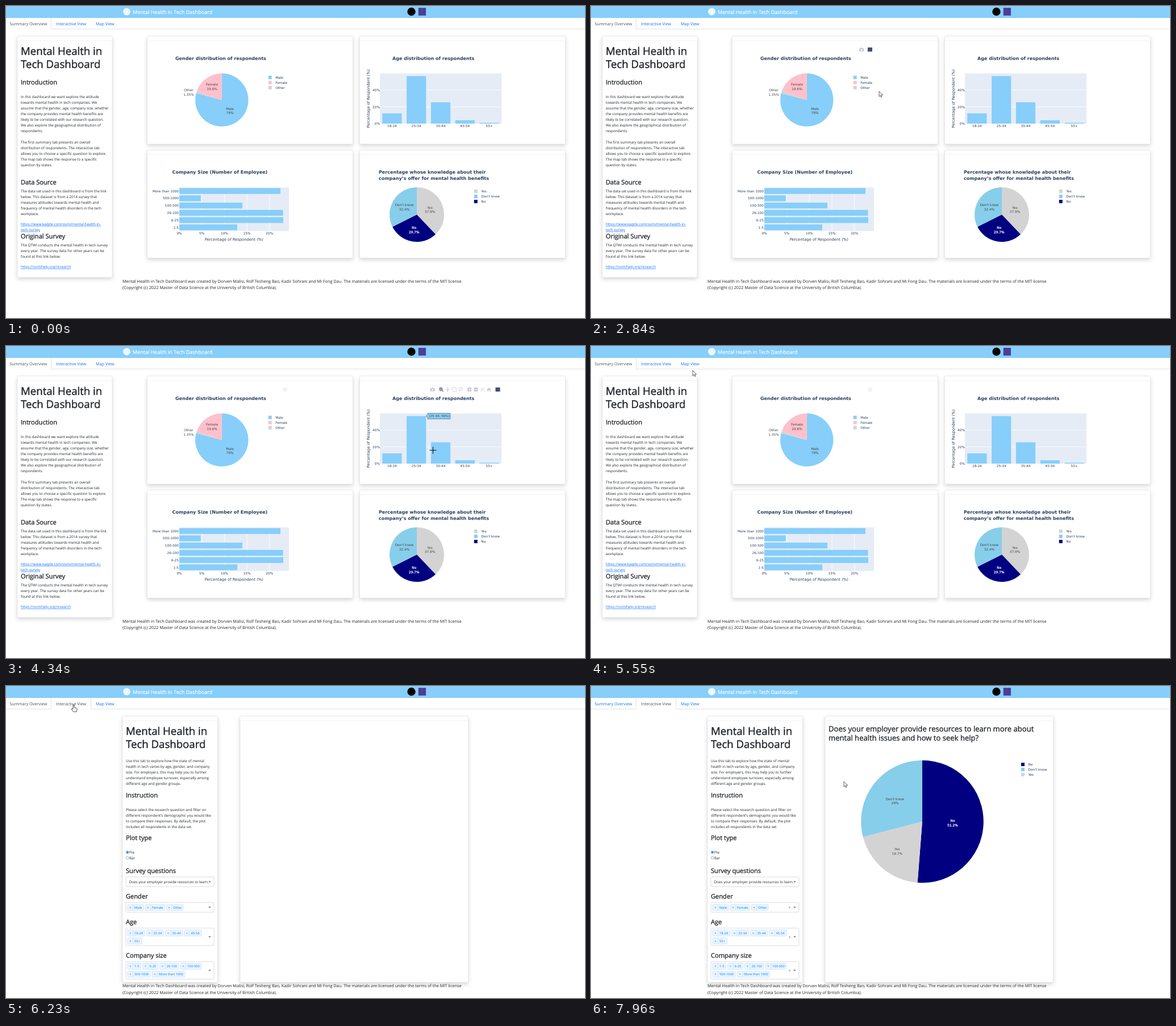
Write an HTML page that moves like this. It is 1019 px wide and 549 px high and loops after 8 s.

```html
<!DOCTYPE html>
<html lang="en">
<head>
<meta charset="utf-8">
<title>Mental Health in Tech Dashboard</title>
<style>
html, body { margin: 0; width: 100%; height: 100%; overflow: hidden; background: #fff; }
svg { display: block; width: 100%; height: 100%; }
text { font: 6.34px "Open Sans", "Noto Sans", sans-serif; fill: #212529; text-rendering: geometricPrecision; white-space: pre; }
/* A thin outline gives the medium weight between regular and semibold */
.h1, .h2, .question { stroke: #212529; stroke-width: .32; }
.h1 { font-size: 18.6px; stroke-width: .42; }
.h2 { font-size: 11.1px; }
.question { font-size: 13.08px; }
.brand { font-size: 9.05px; fill: #fff; stroke: #fff; stroke-width: .15; }
.tab { font-size: 7.25px; fill: #0d6efd; }
.tab.on { fill: #495057; }
.foot { font-size: 7.31px; }
.link { fill: #0d6efd; text-decoration: underline; }
.tag { font-size: 5.8px; fill: #007eff; }
.title, .label, .axis, .tip { font-family: "DejaVu Sans", Verdana, sans-serif; fill: #2a3f5f; }
.title { font-size: 8.03px; font-weight: bold; }
.axis { font-size: 6.79px; }
.label { font-size: 5.8px; }
.tip { font-size: 5.5px; fill: #444; }
.dark { fill: #444; }
.light { fill: #fff; stroke: #fff; stroke-width: .25; }
.mid { text-anchor: middle; }
.end { text-anchor: end; }
.card { fill: #fff; stroke: #dfdfdf; stroke-width: .6; filter: drop-shadow(0 3.5px 3.5px rgba(0,0,0,.16)); }
.icon { fill: #c3c8d1; stroke: none; }
.line { fill: none; stroke: #c3c8d1; stroke-width: 1; }
.active { stroke: #6a7890; stroke-width: 1.3; }
</style>
</head>
<body>
<svg id="stage" viewBox="0 0 1019 549" xmlns="http://www.w3.org/2000/svg"></svg>
<script>
const SKY = '#87cefa', PINK = '#ffc0cb', GRAY = '#d3d3d3', NAVY = '#000080', BLUE = '#87ceeb', PLOT = '#e5ecf6';
const LOOP = 8000, SWITCH = 6160, LOADED = 6630;

const text = (x, y, s, cls = '', more = '') => `<text x="${x}" y="${y}" class="${cls}" ${more}>${s}</text>`;
const lines = (x, y, step, cls, ...rows) => rows.map((s, i) => text(x, y + i * step, s, cls)).join('');
const rect = (x, y, w, h, fill, more = '') => `<rect x="${x}" y="${y}" width="${w}" height="${h}" fill="${fill}" ${more}/>`;
const path = (d, more) => `<path d="${d}" ${more}/>`;
const group = (id, body) => `<g id="${id}">${body}</g>`;

const card = (x, y, r, b) => rect(x, y, r - x, b - y, '#fff', 'class="card" rx="2"') +
  path(`M${x} ${y + 8}H${r}`, 'stroke="#ececec" stroke-width=".7"');

function pie(cx, cy, r, slices) {
  let a = 0;
  const at = p => `${cx + r * Math.sin(p * 2 * Math.PI)} ${cy - r * Math.cos(p * 2 * Math.PI)}`;
  return slices.map(([share, fill]) => {
    const from = at(a), to = at(a += share);
    return path(`M${cx} ${cy}L${from}A${r} ${r} 0 ${share > .5 ? 1 : 0} 1 ${to}Z`, `fill="${fill}"`);
  }).join('');
}

const pair = (x, y, name, value, cls = 'dark') => lines(x, y, 7.5, `label mid ${cls}`, name, value);

const legend = (x, y, items) => items.map(([name, fill], i) =>
  rect(x, y + i * 9 - 3, 6, 6, fill) + text(x + 12.5, y + i * 9 + 2.1, name, 'label')).join('');

function hover(id, x, y, rows, fill, width, dir = 1) {
  const h = rows.length > 1 ? 8.7 : 5, near = x + 3 * dir, far = near + width * dir;
  return group(id, path(`M${x} ${y}L${near} ${y - 3}V${y - h}H${far}V${y + h}H${near}V${y + 3}Z`,
    `fill="${fill}" stroke="#444" stroke-width=".6"`) +
    lines(Math.min(near, far) + 2, y + (rows.length > 1 ? -2 : 2), 7.6, 'tip', ...rows));
}

const icons = {
  camera: '<path class="icon" d="M-4-2.2h2l1-1.2h2l1 1.2h2v5.4h-8z"/><circle r="1.5" fill="#fff" cy=".4"/>',
  zoom: '<g class="line active"><circle cx="-.6" cy="-.6" r="2.5"/><path d="M1.3 1.3 3.6 3.6M-1.8-.6H.6M-.6-1.8V.6"/></g>',
  pan: '<path class="line" d="M-3.6 0H3.6M0-3.6V3.6M-1-2.6 0-3.6 1-2.6M-1 2.6 0 3.6 1 2.6"/>',
  box: '<path class="line" stroke-dasharray="1.6 .8" d="M-3.3-3.3H3.3V3.3H-3.3Z"/>',
  lasso: '<path class="line" d="M-2 1C-5-1-2-3.5 1-3.2S4 1 0 1.2Q-3 1.2-2 3.4"/>',
  plus: '<path class="icon" d="M-3.4-3.4H3.4V3.4H-3.4Z"/><path d="M-2 0H2M0-2V2" stroke="#fff"/>',
  minus: '<path class="icon" d="M-3.4-3.4H3.4V3.4H-3.4Z"/><path d="M-2 0H2" stroke="#fff"/>',
  fit: '<path class="line" d="M-3.2-3.2 3.2 3.2M3.2-3.2-3.2 3.2"/>',
  home: '<path class="icon" d="M0-3.4 4 .2H2.8V3.2H.8V1H-.8V3.2H-2.8V.2H-4Z"/>',
  mark: '<rect x="-4" y="-3.6" width="8" height="7.2" fill="#3f4f75"/>'
};
const modebar = (id, list) => group(id, list.map(([name, x]) =>
  `<g transform="translate(${x} 76.6)">${icons[name]}</g>`).join(''));

const footer = y => lines(205, y, 11.5, 'foot',
  'Mental Health in Tech Dashboard was created by Dorven Malisi, Rolf Tesheng Bao, Kadir Sohrani and Mi Fong Dau. The materials are licensed under the terms of the MIT license',
  '(Copyright (c) 2022 Master of Data Science at the University of British Columbia).');

const header = rect(0, 0, 1019, 21, SKY) +
  '<circle cx="212.5" cy="10" r="6.5" fill="#eef8ff"/><circle cx="713.5" cy="10" r="7.2" fill="#000"/>' +
  rect(725.8, 3.2, 13.2, 13.6, '#4b3f98') +
  text(223, 13.6, 'Mental Health in Tech Dashboard', 'brand') +
  '<path id="tabline" fill="none" stroke="#dee2e6"/>' +
  text(6.5, 34.1, 'Summary Overview', 'tab', 'id="tab0"') +
  text(88, 34.1, 'Interactive View', 'tab', 'id="tab1"') + text(158, 34.1, 'Map View', 'tab');

const intro = card(20, 53, 187, 477.5) +
  lines(26, 86.3, 23, 'h1', 'Mental Health in', 'Tech Dashboard') +
  text(26, 138, 'Introduction', 'h2') +
  lines(26, 162.2, 10, '', 'In this dashboard we want explore the attitude', 'towards mental health in tech companies. We',
    'assume that the gender, age, company size, whether', 'the company provides mental health benefits are',
    'likely to be correlated with our research question.', 'We also explore the geographical distribution of', 'respondents.', '',
    'The first summary tab presents an overall', 'distribution of respondents. The interactive tab',
    'allows you to choose a specific question to explore.', 'The map tab shows the response to a specific', 'question by states.') +
  text(26, 314.3, 'Data Source', 'h2') +
  lines(26, 328.2, 10, '', 'The data set used in this dashboard is from the link', 'below. This dataset is from a 2014 survey that',
    'measures attitudes towards mental health and', 'frequency of mental health disorders in the tech', 'workplace.') +
  lines(26, 385.8, 10, 'link', 'https://www.kaggle.com/osmi/mental-health-in-', 'tech-survey') +
  text(26, 409.4, 'Original Survey', 'h2') +
  lines(26, 423.4, 10, '', 'The QTWI conducts the mental health in tech survey', 'every year. The survey data for other years can be', 'found at this link below.') +
  text(26, 461.2, 'https://osmihelp.org/research', 'link');

const genderChart = card(248.5, 53, 610.5, 243) + text(298, 94.6, 'Gender distribution of respondents', 'title') +
  pie(379.8, 165.3, 46.7, [[.7905, SKY], [.0135, GRAY], [.196, PINK]]) +
  pair(394, 182.6, 'Male', '79%') + pair(362.5, 140.1, 'Female', '19.6%') + pair(321.5, 150.2, 'Other', '1.35%') +
  legend(461.7, 125.7, [['Male', SKY], ['Female', PINK], ['Other', GRAY]]);

const ageChart = card(622.5, 53, 984.5, 243) + text(680, 94.6, 'Age distribution of respondents', 'title') +
  rect(658, 118.7, 214, 88.3, PLOT) + path('M658 147.8H872M658 177.4H872', 'stroke="#fff" stroke-width=".8"') +
  [['18-24', 12.2], ['25-34', 56.5], ['35-44', 25.4], ['45-54', 4], ['55+', 1]].map(([name, v], i) => {
    const x = 679.4 + i * 42.8, h = v * 1.48;
    return rect(x - 17.1, 207 - h, 34.2, h, SKY) + text(x, 213.4, name, 'label mid');
  }).join('') +
  [0, 20, 40].map(v => text(658, 209.2 - v * 1.48, v + '%', 'label end')).join('') +
  text(0, 0, 'Percentage of Respondent (%)', 'axis mid', 'transform="translate(639.8 163) rotate(-90)"');

const sizeChart = card(248.5, 253.5, 610.5, 443.5) + text(292.5, 295.3, 'Company Size (Number of Employee)', 'title') +
  rect(305, 319.2, 193, 76.6, PLOT) +
  [0, 1, 2, 3, 4].map(i => {
    const x = 305 + i * 39.7;
    return path(`M${x} 319.2V395.8`, 'stroke="#fff" stroke-width=".8"') + text(x, 402.3, i * 5 + '%', 'label mid');
  }).join('') +
  [['More than 1000', 483], ['500-1000', 342.7], ['100-500', 416], ['26-100', 487.5], ['6-25', 488], ['1-5', 407]].map(([name, r], i) => {
    const y = 325.6 + i * 12.77;
    return rect(305, y - 5.1, r - 305, 10.2, SKY) + text(304, y + 2.1, name, 'label end');
  }).join('') +
  text(401.3, 413.3, 'Percentage of Respondent (%)', 'axis mid');

const benefitChart = card(622.5, 253.5, 984.5, 443.5) +
  lines(656, 295.3, 10.2, 'title', 'Percentage whose knowledge about their', 'company’s offer for mental health benefits') +
  pie(723, 367, 48, [[.379, GRAY], [.297, NAVY], [.324, BLUE]]) +
  pair(746, 356.6, 'Yes', '37.9%') + pair(701, 352.3, "Don't know", '32.4%') + pair(718.3, 392.2, 'No', '29.7%', 'light') +
  legend(823.8, 326, [['Yes', GRAY], ["Don't know", BLUE], ['No', NAVY]]);

const summary = intro + genderChart + ageChart + sizeChart + benefitChart + footer(486.6) +
  modebar('bar1', [['camera', 476], ['mark', 491]]) + rect(487, 73, 8, 7.2, '#f3f3f3', 'id="ghost"') +
  modebar('bar2', [['camera', 750.5], ['zoom', 766], ['pan', 777.3], ['box', 789], ['lasso', 800.3], ['plus', 815.6],
    ['minus', 827], ['fit', 838.5], ['home', 850], ['mark', 865.5]]) +
  hover('male', 417, 183.8, ['Male', '79%'], SKY, 17) + hover('female', 346, 141, ['Female', '19.6%'], PINK, 25, -1) +
  hover('age0', 696.5, 189, ['(18-24, 12%)'], SKY, 40) + hover('age1', 739.3, 123.3, ['(25-34, 56%)'], SKY, 39.5) +
  hover('age2', 782.1, 169.4, ['(35-44, 25%)'], SKY, 39.5);

const select = (y, b) => rect(211, y, 155, b - y, '#fff', 'rx="2" stroke="#ccc" stroke-width=".7"') +
  path(`M356 ${(y + b) / 2 - 1.2}h5l-2.5 2.7z`, 'fill="#888"');
const tags = (y, ...list) => list.map(([name, x, r]) =>
  rect(x, y - 5.4, r - x, 10.8, '#ebf5ff', 'rx="1" stroke="#c2e0ff" stroke-width=".7"') +
  path(`M${x + 9.6} ${y - 5.4}v10.8`, 'stroke="#c2e0ff" stroke-width=".7"') +
  text(x + 5, y + 2, '×', 'tag mid') + text(x + 12, y + 2.1, name, 'tag')).join('');
const radio = (y, name, on) => `<circle cx="213.7" cy="${y}" r="2.4" fill="#fff" stroke="${on ? '#0075ff' : '#767676'}" stroke-width=".6"/>` +
  (on ? `<circle cx="213.7" cy="${y}" r="1.5" fill="#0075ff"/>` : '') + text(217, y + 2.5, name);

const controls = card(205, 53, 372.5, 521.5) +
  lines(211, 86.3, 23, 'h1', 'Mental Health in', 'Tech Dashboard') +
  lines(211, 134.3, 10, '', 'Use this tab to explore how the state of mental', 'health in tech varies by age, gender, and company',
    'size. For employers, this may help you to further', 'understand employee turnover, especially among', 'different age and gender groups.') +
  text(211, 196.3, 'Instruction', 'h2') +
  lines(211, 220, 10, '', 'Please select the research question and filter on', 'different respondent’s demographic you would like',
    'to compare their responses. By default, the plot', 'includes all respondents in the data set.') +
  text(211, 271.2, 'Plot type', 'h2') + radio(292.5, 'Pie', true) + radio(302.4, 'Bar') +
  text(211, 329.2, 'Survey questions', 'h2') + select(336, 353) +
  text(216.5, 346.6, 'Does your employer provide resources to learn.') +
  text(211, 374.4, 'Gender', 'h2') + select(381, 398) +
  tags(389.6, ['Male', 214, 242], ['Female', 245, 279], ['Other', 282, 312]) +
  text(211, 419.2, 'Age', 'h2') + select(426, 456.8) +
  tags(434.6, ['18-24', 214, 244.5], ['25-34', 247.3, 277.5], ['35-44', 280.5, 310.7], ['45-54', 313.5, 344]) +
  tags(448.5, ['55+', 214, 239.5]) +
  text(211, 478.4, 'Company size', 'h2') + select(485, 515.8) +
  tags(493.1, ['1-5', 214, 237.5], ['6-25', 240.5, 267.5], ['26-100', 270.5, 304], ['100-500', 307, 343.5]) +
  tags(507, ['500-1000', 214, 254], ['More than 1000', 257, 314.5]);

const answer = [389.6, 441.3, 500.4].map(y => text(349.5, y + 2.5, '×', 'mid', 'fill-opacity=".8"')).join('') +
  lines(418, 80.3, 16, 'question', 'Does your employer provide resources to learn more about', 'mental health issues and how to seek help?') +
  pie(583, 238.5, 107.8, [[.5124, NAVY], [.1972, GRAY], [.2904, BLUE]]) +
  pair(636.5, 239.4, 'No', '51.2%', 'light') + pair(535, 200.6, "Don't know", '29%') + pair(538.8, 289.4, 'Yes', '19.7%') +
  legend(757, 138, [['No', NAVY], ["Don't know", BLUE], ['Yes', GRAY]]);

const cursors = '<g id="cursor">' +
  group('arrow', path('M0 0V9.4L2.2 7.4 3.6 10.6 5.1 10 3.7 6.8H6.6Z', 'fill="#fff" stroke="#222" stroke-width=".7"')) +
  group('cross', path('M-6 0H6M0-6V6', 'stroke="#111" stroke-width="1.1"')) +
  group('hand', path('M-1 1Q0-.6 1 1V5L5 6Q6 6.5 6 8L5 12.5H-.5L-3.8 8Q-3.6 6.4-2 7.2L-1 8Z', 'fill="#fff" stroke="#222" stroke-width=".8"')) + '</g>';

document.getElementById('stage').innerHTML = header + group('summary', summary) +
  group('interactive', controls + card(412, 53, 813.5, 521.5) + footer(530.2) + group('answer', answer)) + cursors;

const el = id => document.getElementById(id);
const show = (id, on) => { el(id).style.display = on ? '' : 'none'; };

// Cursor moves: start, end, steps, evenly timed way points
const moves = [
  [600, 1350, 12, [[856, 541], [820, 500], [620, 330], [450, 205], [410, 182]]],
  [1760, 2230, 8, [[410, 182], [370, 146]]],
  [2700, 3450, 12, [[370, 146], [507, 150], [625, 168], [668, 190], [677, 196]]],
  [3650, 4000, 6, [[677, 196], [719, 187]]],
  [4200, 4540, 6, [[719, 187], [751.5, 183.5], [768, 181]]],
  [4940, 5680, 12, [[768, 181], [700, 150], [560, 115], [400, 85], [260, 58], [179, 43], [143, 41]]],
  [5750, 6430, 10, [[143, 41], [125, 35], [119, 32.8], [119, 32.8]]],
  [7620, 7960, 6, [[119, 32.8], [280, 95], [410, 150], [445, 168]]]
];
const tips = { male: [1280, 2100], female: [2100, 2700], age0: [3380, 3780], age1: [3780, 4400], age2: [4400, 5000] };

function cursorAt(t) {
  const move = moves.filter(m => t >= m[0]).pop();
  if (!move) return null;
  const [start, end, steps, points] = move;
  const step = Math.floor((t - start) / (end - start) * (steps - 1) + .001) + 1;
  const u = Math.min(1, step / steps) * (points.length - 1);
  const i = Math.min(Math.floor(u), points.length - 2);
  return points[i].map((v, k) => v + (points[i + 1][k] - v) * (u - i));
}

function draw() {
  const t = performance.now() % LOOP, second = t >= SWITCH;
  show('summary', !second);
  show('interactive', second);
  show('answer', t >= LOADED);
  const [a, b] = second ? [79.5, 149.5] : [-1, 79.5];
  el('tabline').setAttribute('d', `M-1 40.5H${a}V21M${b} 21V40.5H1019`);
  el('tab0').classList.toggle('on', t < SWITCH + 140);
  el('tab1').classList.toggle('on', second);

  const pos = cursorAt(t);
  const inside = (x, y, r, bottom) => !!pos && pos[0] > x && pos[0] < r && pos[1] > y && pos[1] < bottom;
  const overGender = inside(248, 53, 611, 243);
  show('bar1', overGender);
  show('ghost', t > 2900 && !overGender);
  show('bar2', inside(622, 53, 985, 243));
  for (const id in tips) show(id, t >= tips[id][0] && t < tips[id][1]);

  show('cursor', !!pos);
  if (pos) el('cursor').setAttribute('transform', `translate(${pos})`);
  const onPlot = !second && inside(658, 119, 872, 207), onTab = inside(80, 21, 200, 40.5);
  show('cross', onPlot);
  show('hand', onTab);
  show('arrow', !onPlot && !onTab);
  requestAnimationFrame(draw);
}
draw();
</script>
</body>
</html>
```
